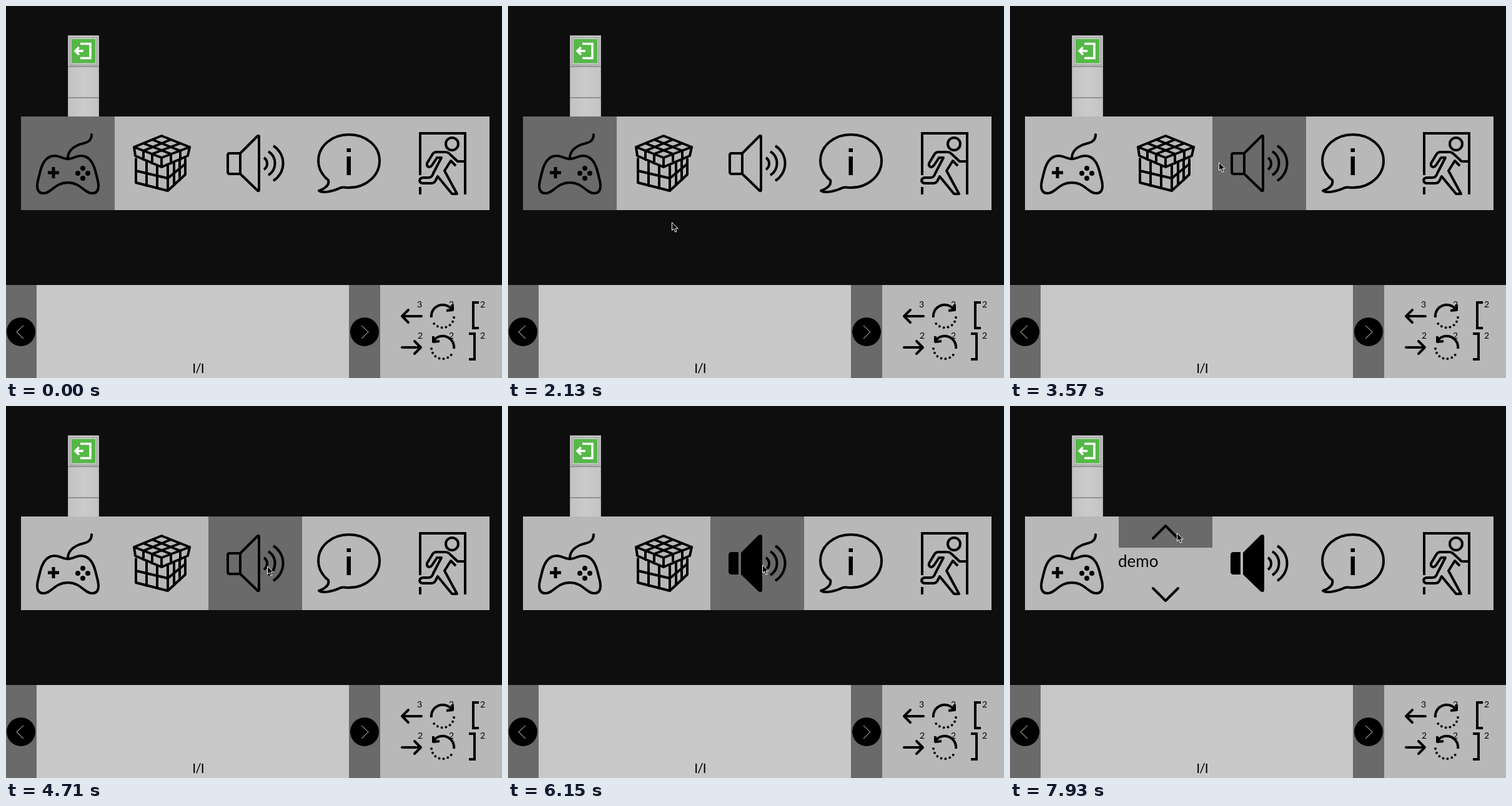
These frames come from a looping animation (794 by 596 pixels, 8 s). An HTML page:

```html
<!DOCTYPE html>
<html lang="en">
<head>
<meta charset="utf-8">
<title>Game menu</title>
<style>
  html, body { margin: 0; width: 100%; height: 100%; overflow: hidden; background: #0e0e0e; }
  svg { position: absolute; left: 0; top: 0; display: block; }
  text { font-family: Lato, sans-serif; }
  .line { fill: none; stroke: #000; stroke-width: 4; stroke-linejoin: round; }
  .round { stroke-linecap: round; }
  .dots { stroke-dasharray: 0 7; stroke-linecap: round; }
  .count { font: 14px "Open Sans", sans-serif; text-anchor: middle; }
  .hover, .unmuted, .muted, .cube, .levels { animation: 8s step-end infinite; }
  .hover { animation-name: hover; }
  .muted { animation-name: muted; }
  .unmuted { animation-name: unmuted; }
  .cube { animation-name: cube; }
  .levels { animation-name: levels; }
  .cursor { animation: move 8s step-end infinite; }

  @keyframes hover {
    0% { transform: none; }
    28.1% { transform: translate(150px, 0); }
    33.5% { transform: none; }
    40.6% { transform: translate(150px, 0); }
    44.6% { transform: translate(300px, 0); }
    60.5% { transform: translate(450px, 0); }
    65.8% { transform: translate(600px, 0); }
    68.4% { transform: translate(450px, 0); }
    70.7% { transform: translate(300px, 0); }
    89% { transform: translate(150px, 0); }
    92% { transform: translate(150px, 50px) scaleY(.33333); }
    96.5%, 100% { transform: translate(150px, 0) scaleY(.33333); }
  }
  @keyframes muted {
    0%, 57.25% { opacity: 1; }
    51.85%, 76.85%, 100% { opacity: 0; }
  }
  @keyframes unmuted {
    0%, 57.25% { opacity: 0; }
    51.85%, 76.85%, 100% { opacity: 1; }
  }
  @keyframes cube { 0% { opacity: 1; } 92%, 100% { opacity: 0; } }
  @keyframes levels { 0% { opacity: 0; } 92%, 100% { opacity: 1; } }

  /* The pointer moves in mouse-event sized steps and rests in between. */
  @keyframes move {
    0% { left: 651px; top: 600px; }
    14.1% { left: 651px; top: 583px; animation-timing-function: steps(12); }
    21.5% { left: 453px; top: 526px; }
    23.8% { left: 453px; top: 526px; animation-timing-function: steps(5); }
    26.6% { left: 262px; top: 346px; animation-timing-function: steps(4); }
    29.1% { left: 225px; top: 313px; }
    31.5% { left: 225px; top: 313px; animation-timing-function: steps(7); }
    35.6% { left: 110px; top: 290px; animation-timing-function: steps(6); }
    38.7% { left: 106px; top: 275px; animation-timing-function: steps(5); }
    42.1% { left: 240px; top: 258px; animation-timing-function: steps(4); }
    44.6% { left: 334px; top: 250px; }
    45.1% { left: 346px; top: 250px; }
    48.4% { left: 346px; top: 250px; animation-timing-function: steps(5); }
    51% { left: 385px; top: 256px; }
    57.5% { left: 385px; top: 256px; animation-timing-function: steps(15); }
    65.8% { left: 632px; top: 257px; animation-timing-function: steps(2); }
    67.1% { left: 655px; top: 260px; }
    67.6% { left: 655px; top: 260px; animation-timing-function: steps(7); }
    71.7% { left: 408px; top: 254px; }
    74% { left: 407px; top: 254px; }
    86.2% { left: 407px; top: 254px; animation-timing-function: steps(10); }
    91.2% { left: 245px; top: 254px; }
    93.1% { left: 245px; top: 254px; animation-timing-function: steps(8); }
    99.1%, 100% { left: 267px; top: 203px; }
  }
</style>
</head>
<body>
<svg width="794" height="596" viewBox="0 0 794 596">
  <defs>
    <linearGradient id="tile">
      <stop stop-color="#c2c2c2"/><stop offset=".5" stop-color="#cbcbcb"/><stop offset="1" stop-color="#c4c4c4"/>
    </linearGradient>
    <path id="half-pad" d="M99 245C91 245 86 240 78 240C66 240 59 249 55 264L51 280C48 294 52 300 60 300C73 300 78 283 99 283"/>
  </defs>
  <rect width="794" height="596" fill="#0e0e0e"/>

  <!-- Level track -->
  <rect x="99" y="47" width="50" height="130" fill="url(#tile)"/>
  <g fill="none" stroke="#929292">
    <path d="M99.5 177V47.5H148.5V177" stroke="#a6a6a6"/>
    <path d="M99 97H149M99 147H149" stroke-width="2"/>
    <rect x="102.5" y="50.5" width="43" height="44"/>
  </g>
  <rect x="105" y="53" width="38" height="38.5" fill="#55b848"/>
  <path d="M119 60.500H135V83.500H119M124 72H111M117 66L111 72L117 78" fill="none" stroke="#fff" stroke-width="3.500"/>

  <!-- Menu -->
  <rect x="24" y="177" width="750" height="150" fill="#b8b8b8"/>
  <g transform="translate(24 177)"><rect class="hover" width="150" height="150" fill="#6a6a6a"/></g>

  <g class="line round">
    <path d="M137 206C137 220 124 219 115 223C104 228 99 235 99 244"/>
    <use href="#half-pad"/>
    <use href="#half-pad" transform="translate(198) scale(-1 1)"/>
  </g>
  <path d="M67 267H85M76 258V276" stroke="#000" stroke-width="5"/>
  <circle cx="123" cy="260" r="4"/><circle cx="115" cy="268" r="4"/>
  <circle cx="131" cy="268" r="4"/><circle cx="123" cy="276" r="4"/>

  <g class="cube line round">
    <path d="M205 226L249 208L294 226L249 243ZM220 220L264 237M234 214L279 232M220 232L264 214M234 237L279 220"/>
    <path d="M205 226L207 240L249 258L291 240L294 226M220 232V246M234 238V252M249 243V258M264 238V252M279 232V246"/>
    <path d="M208 245V283L259 296L287 270V245M225 250V288M242 256V292M259 256V296M269 252V287M278 248V279M208 264L259 276L287 253"/>
  </g>
  <g class="levels">
    <path class="line round" d="M229 212L249 192L269 212M229 292L249 312L269 292"/>
    <text x="173" y="258" font-size="26">demo</text>
  </g>

  <path class="muted line" d="M375 236H358Q355 236 355 239V265Q355 269 358 269H375M375 236L402 209Q405 206 405 210V294Q405 298 402 295L375 269Z"/>
  <path class="unmuted" d="M369 234H358Q353 234 353 239V265Q353 270 358 270H369ZM373 235L401 207Q407 204 407 210V294Q407 300 401 297L373 270Z"/>
  <path class="line" d="M413 243A11.500 11.500 0 0 1 413 262M420 233A22.400 22.400 0 0 1 420 271M428 224A33 33 0 0 1 428 280"/>

  <path class="line" d="M516 279C506 271 500 260 500 248C500 224 522 206 549 206S598 224 598 248S576 291 549 291C543 291 540 290 536 291C522 298 506 300 501 296C512 292 518 287 516 279Z"/>
  <path d="M545.500 228H552V234H545.500ZM545.500 241H552V271H545.500Z"/>

  <path class="line" style="stroke-linejoin:miter" d="M663 271V204H735V302M663 290V302"/>
  <circle class="line" cx="714" cy="221" r="10"/>
  <path class="line" d="M735 249H723L709 236Q707 234 703 234H689Q685 234 683 237L674 252Q673 257 677 258Q680 258 682 255L690 243H697L684 268Q682 275 676 275H667Q662 276 662 280Q663 284 668 284H681Q686 284 688 279L691 273L714 301H722L702 264L712 248L720 256"/>

  <!-- Program bar -->
  <rect y="447" width="599" height="149" fill="#6a6a6a"/>
  <rect x="49" y="447" width="500" height="149" fill="#c8c8c8"/>
  <rect x="599" y="447" width="195" height="149" fill="#b8b8b8"/>
  <circle cx="24" cy="522" r="23"/><circle cx="574" cy="522" r="23"/>
  <path d="M28 512L17 522L28 533M569 512L580 522L569 533" fill="none" stroke="#777" stroke-width="1.500"/>
  <text x="307.500" y="588" font-size="21" letter-spacing="-.9" text-anchor="middle">I/I</text>

  <!-- Commands -->
  <path class="line round" d="M665 497H634M644 487L634 497L644 507M634 547H664M654 537L664 547L654 557"/>
  <path class="line" d="M681 499A18 18 0 0 1 714 487M715 478V487L705 488M717 549A18 18 0 0 0 684 537M684 529V538L694 537"/>
  <path class="line dots" d="M717 499A18 18 0 0 1 682 503M681 549A18 18 0 0 0 716 553"/>
  <path class="line" style="stroke-linejoin:miter" d="M757 475H748V516H757M741 525H750V566H741"/>
  <g class="count">
    <text x="662" y="483">3</text><text x="713" y="483">2</text><text x="763" y="483">2</text>
    <text x="663" y="533">2</text><text x="713" y="533">2</text><text x="763" y="533">2</text>
  </g>
</svg>
<svg class="cursor" width="12" height="18" viewBox="0 0 12 18">
  <path d="M.5 .8V13.500L3.500 10.800L5.700 16.200L8 15.200L6 10.300H10Z" stroke="#fff"/>
</svg>
</body>
</html>
```
